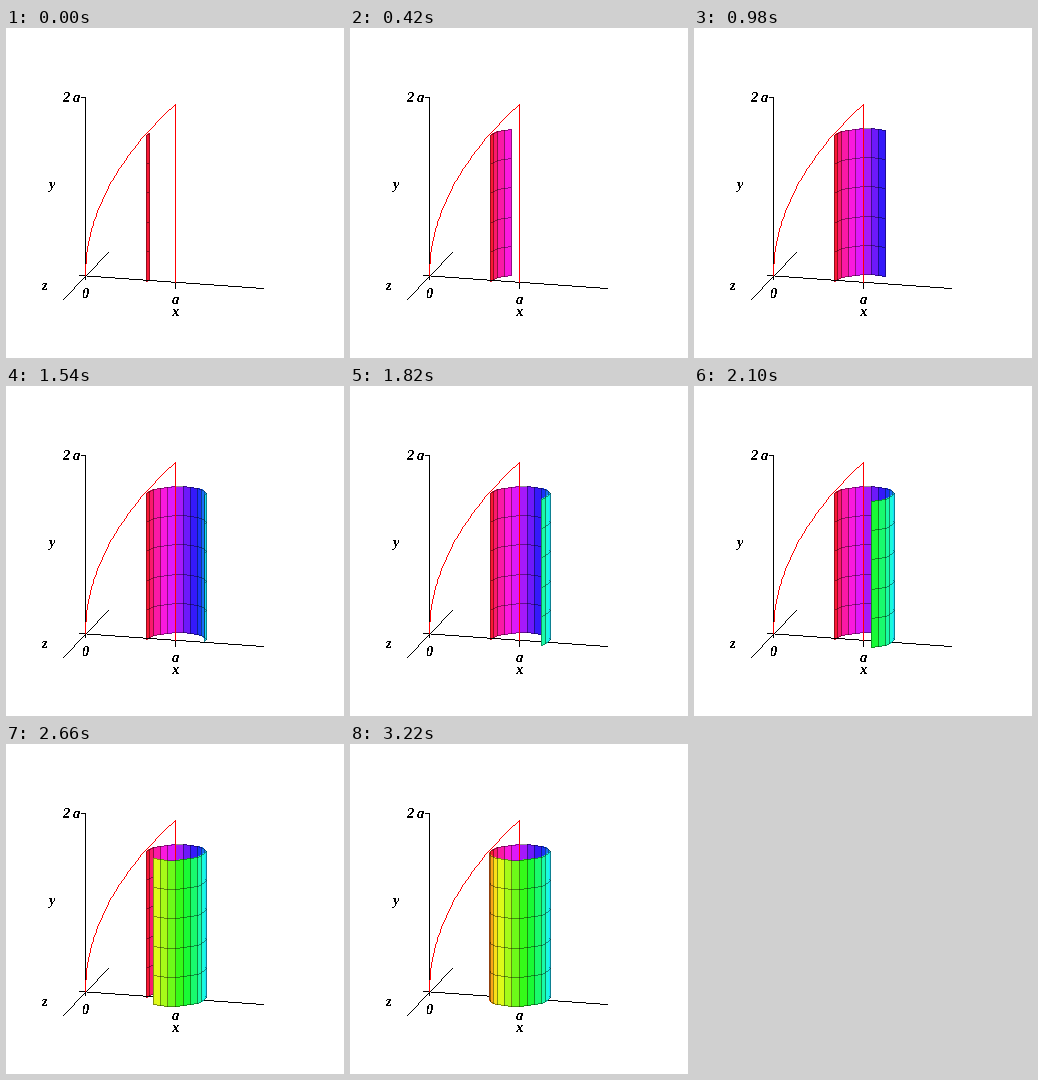
A matplotlib script that plays this animation: 338x330 px, repeating every 3.36 s.

```python
import colorsys

import matplotlib.pyplot as plt
import numpy as np
from matplotlib.animation import FuncAnimation
from matplotlib.collections import PolyCollection

W, H, DPI = 338, 330, 100
STEPS, INTERVAL = 24, 140
PX = 72 / DPI

# Cylinder on screen: centre, radii, height and number of bands
CX, TOP, RX, RY, TALL, BANDS = 169, 108, 30.5, 8, 146, 5
START, STEP, TILT = 15, 15, 97.5

# Coordinate system on screen
OX, OY, SPAN, RISE, SLOPE = 79, 247, 90, 178, 0.073
GRID = (0, 0, 0, 0.42)
DOT = 0.3 * np.array([[-1, -1], [1, -1], [1, 1], [-1, 1]])

plt.rcParams["text.antialiased"] = False
fig = plt.figure(figsize=(W / DPI, H / DPI), dpi=DPI, facecolor="white")
ax = fig.add_axes([0, 0, 1, 1])
ax.set_xlim(-0.5, W - 0.5)
ax.set_ylim(H - 0.5, -0.5)
ax.axis("off")


def trace(path):
    """Whole pixels along a polyline, each one stepped to once."""
    dots = []
    for p, q in zip(path[:-1], path[1:]):
        p, q = np.floor(np.array([p, q]) + 0.5)
        n = int(np.abs(q - p).max()) + 1
        dots.append(np.floor(np.linspace(p, q, n) + 0.5))
    return np.concatenate(dots)


def crisp(paths, color, z):
    """Hard-edged lines one pixel wide."""
    dots = np.unique(np.concatenate([trace(p) for p in paths]), axis=0)
    lines = PolyCollection(dots[:, None, :] + DOT, facecolors=[color],
                           linewidths=0, antialiaseds=False, zorder=z)
    ax.add_collection(lines)
    return lines


def label(x, y, text):
    ax.text(x, y, text, ha="center", va="baseline", family="Liberation Serif",
            style="italic", weight="bold", size=14.5 * PX, zorder=2)


def floor_y(x):
    return OY + SLOPE * (x - OX)


def rim(angle):
    a = np.radians(angle)
    x = CX - RX * np.cos(a)
    y = TOP - RY * np.cos(a - np.radians(TILT))
    return np.floor(x + 0.5), np.floor(y + 0.5)


def strip(i):
    """One vertical panel of the shell with its grid lines."""
    a = START + i * STEP
    (x0, y0), (x1, y1) = rim(a), rim(a + STEP)
    behind = i < STEPS // 2
    depth = np.cos(np.radians(a + STEP / 2 - TILT))
    z = (1 if behind else 3) - 0.2 * depth
    color = colorsys.hsv_to_rgb(1 - (i + 0.5) / STEPS, 0.9, 0.98)
    face, = ax.fill([x0, x1, x1, x0], [y0, y1, y1 + TALL, y0 + TALL],
                    color=color, lw=0, antialiased=False, zorder=z)
    paths = [[(x0, y0 + d), (x1, y1 + d)] for d in np.linspace(0, TALL, BANDS + 1)]
    paths.append([(x1, y1), (x1, y1 + TALL)])
    if i == 0:
        paths.append([(x0, y0), (x0, y0 + TALL)])
    last = i == STEPS - 1
    return face, crisp(paths, GRID, z + 0.01 if last else 1.5 if behind else 3.5)


# Axes and ticks
axes = [
    [(OX, 69), (OX, 251)],
    [(75, 69), (OX, 69)],
    [(73, floor_y(73)), (257, floor_y(257))],
    [(57, 271), (102, 224)],
    [(CX, floor_y(CX)), (CX, 260)],
]
crisp(axes, "black", 2)

# Curve y = 2 sqrt(a x) and its right-hand bound
u = np.linspace(0, 1, 80) ** 2
xs = OX + SPAN * u
curve = np.column_stack([xs, floor_y(xs) - RISE * np.sqrt(u)])
bound = [(CX, floor_y(CX) - RISE), (CX, floor_y(CX))]
crisp([curve, bound], "red", 2.1)

label(60, 74, "2")
label(70, 74, "a")
label(46, 161, "y")
label(39, 262, "z")
label(80, 269, "0")
label(169, 275, "a")
label(169, 288, "x")

strips = [strip(i) for i in range(STEPS)]


def draw(k):
    for i, parts in enumerate(strips):
        for part in parts:
            part.set_visible(i <= k)
    return [part for parts in strips for part in parts]


anim = FuncAnimation(fig, draw, frames=STEPS, interval=INTERVAL, repeat=True,
                     repeat_delay=0, blit=False)
plt.show()
```
